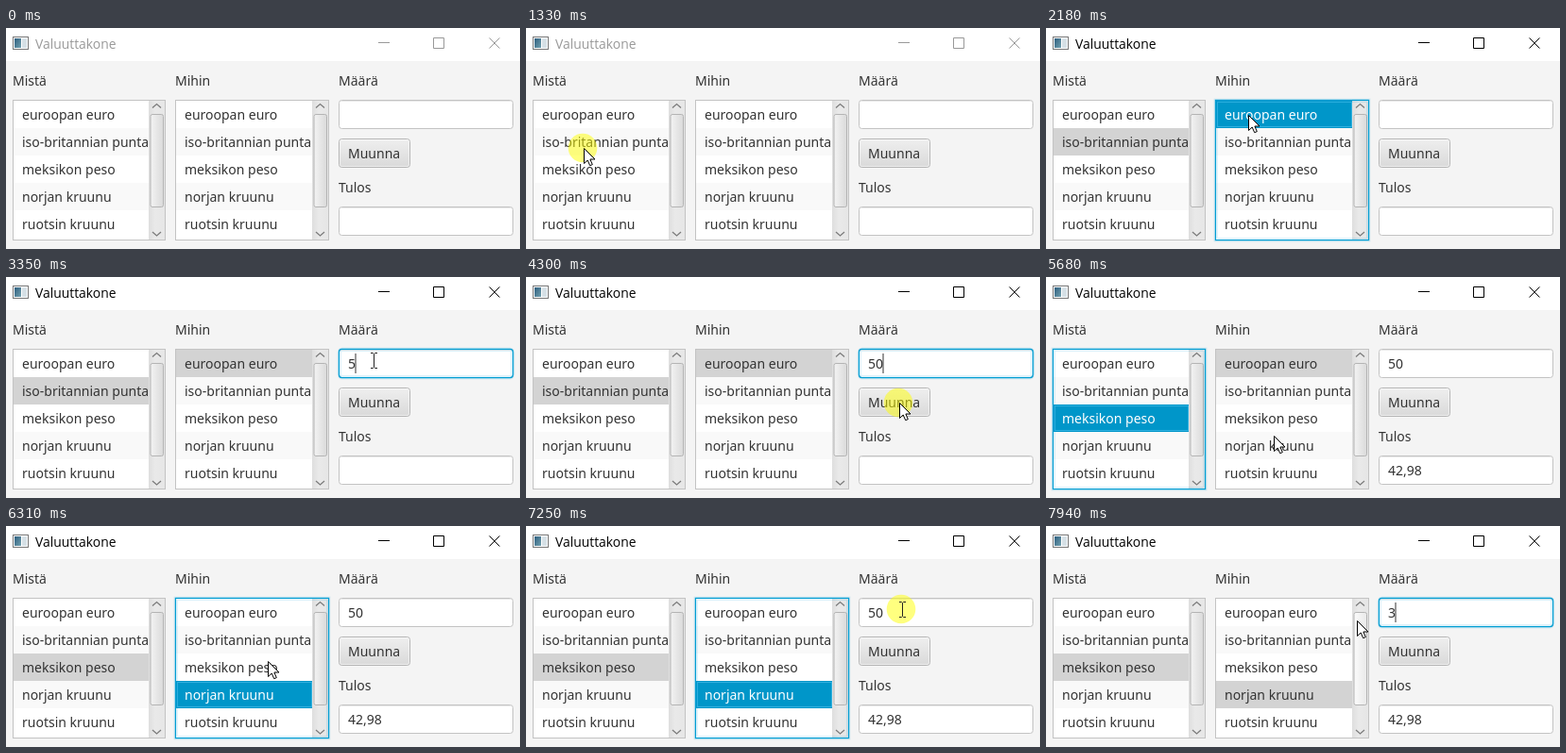
Recreate the animation shown at these times as an HTML page. Size 544 px wide and 234 px high, loop 8 s.

```html
<!DOCTYPE html>
<html lang="fi">
<head>
<meta charset="utf-8">
<title>Valuuttakone</title>
<style>
html, body { margin: 0; width: 100%; height: 100%; overflow: hidden; background: #f4f4f4; }
svg { display: block; width: 544px; height: 234px; }
text { font: 14px "Noto Sans", "Open Sans", sans-serif; fill: #333; white-space: pre; }
.title { font: 13.9px "Open Sans", "Noto Sans", sans-serif; }
</style>
</head>
<body>
<svg id="stage" viewBox="0 0 544 234">
  <defs>
    <linearGradient id="btn" x2="0" y2="1"><stop stop-color="#efefef"/><stop offset="1" stop-color="#d9d9d9"/></linearGradient>
    <linearGradient id="thumb"><stop stop-color="#f3f3f3"/><stop offset="1" stop-color="#dadada"/></linearGradient>
    <linearGradient id="thumbHover"><stop stop-color="#fbfbfb"/><stop offset="1" stop-color="#e9e9e9"/></linearGradient>
    <linearGradient id="track"><stop stop-color="#dedede"/><stop offset=".4" stop-color="#e9e9e9"/><stop offset="1" stop-color="#e6e6e6"/></linearGradient>
    <linearGradient id="pane" x2="1" y2="1"><stop stop-color="#2f5f7f"/><stop offset="1" stop-color="#6f9fae"/></linearGradient>
  </defs>
</svg>
<script>
const LOOP = 8000, STEP = 78;
const BLUE = '#0096c9', RING = '#039ed3', BORDER = '#c3c3c3';
const ITEMS = ['euroopan euro', 'iso-britannian punta', 'meksikon peso', 'norjan kruunu', 'ruotsin kruunu'];
const stage = document.getElementById('stage');

function add(tag, attrs, parent = stage) {
  const el = document.createElementNS('http://www.w3.org/2000/svg', tag);
  set(el, attrs);
  parent.append(el);
  return el;
}
function set(el, attrs) {
  for (const k in attrs) el.setAttribute(k, attrs[k]);
}
function rect(x, y, width, height, fill, more = {}, parent = stage) {
  return add('rect', { x, y, width, height, fill, ...more }, parent);
}
function label(x, y, str, parent = stage) {
  const el = add('text', { x, y }, parent);
  el.textContent = str;
  return el;
}
const show = (el, on) => el.setAttribute('visibility', on ? 'visible' : 'hidden');

// focus ring with a faint halo around the box
function makeRing(x, y, w, h, rx = 0) {
  const ring = add('g', { fill: 'none', stroke: RING });
  rect(x + .8, y + .8, w - 1.6, h - 1.6, 'none', { rx, 'stroke-width': 4.4, 'stroke-opacity': .13 }, ring);
  rect(x + .4, y + .4, w - .8, h - .8, 'none', { rx, 'stroke-width': 1.2 }, ring);
  return ring;
}

// title bar
rect(0, 0, 544, 234, '#f4f4f4');
rect(0, 0, 544, 35, '#fff');
rect(7.5, 9.5, 16, 13, '#fff', { stroke: '#777' });
rect(9, 11, 7, 10, 'url(#pane)');
rect(17, 11, 5, 10, '#d5e0e6');
const title = label(31, 22, 'Valuuttakone');
set(title, { class: 'title' });
const controls = add('path', { d: 'M394 15.5h12M452.5 10.5h11v11h-11zM511.5 10.5l11 11m0-11l-11 11', fill: 'none' });

label(7, 61, 'Mistä');
label(179, 61, 'Mihin');
label(352, 61, 'Määrä');
label(352, 174, 'Tulos');

function makeList(x, w) {
  const bar = x + w - 18;
  const clip = add('clipPath', { id: 'clip' + x });
  rect(x, 76, w - 17, 149, '#000', {}, clip);
  rect(x, 76, w, 149, '#fff');
  const body = add('g', { 'clip-path': `url(#clip${x})` });
  const rows = ITEMS.map((item, i) => ({
    bg: rect(x + 1, 77 + 29 * i, w - 18, 29, '#fff', {}, body),
    edge: rect(x + 2.5, 78.5 + 29 * i, w - 21, 26, 'none', { stroke: '#2fb0df' }, body),
    text: label(x + 10, 97 + 29 * i, item, body)
  }));
  rect(bar, 77, 17, 147, 'url(#track)');
  const thumb = rect(bar + 2, 91.5, 13.5, 98, '#eee', { rx: 2, stroke: '#b4b4b4' });
  add('path', { d: `M${bar + 4} 84.5l4.5-4 4.5 4M${bar + 4} 216l4.5 4 4.5-4`, fill: 'none', stroke: '#7c7c7c', 'stroke-width': 1.3 });
  rect(x + .5, 76.5, w - 1, 148, 'none', { stroke: BORDER });
  const ring = makeRing(x, 76, w, 149);
  return (selected, focused, px, py) => {
    rows.forEach((r, i) => {
      const on = i === selected;
      set(r.bg, { fill: on ? (focused ? BLUE : '#d3d3d3') : i % 2 ? '#f9f9f9' : '#fff' });
      show(r.edge, on && focused);
      r.text.style.fill = on && focused ? '#fff' : '#333';
    });
    const hover = px > bar && px < bar + 17 && py > 91 && py < 190;
    set(thumb, { fill: hover ? 'url(#thumbHover)' : 'url(#thumb)' });
    show(ring, focused);
  };
}
const drawFrom = makeList(7, 162), drawTo = makeList(179, 163);

function makeField(y) {
  rect(352.5, y + .5, 184, 30, '#fff', { rx: 3, stroke: BORDER });
  rect(354, y + 1, 181, 1, '#e8e8e8');
}
makeField(76);
makeField(189);
const amountRing = makeRing(352, 76, 185, 31, 3);
const highlight = rect(361, 81, 18, 21, BLUE);
const amount = add('text', { x: 362, y: 97 });
const digits = [add('tspan', {}, amount), add('tspan', {}, amount)];
const caret = rect(361.5, 81, 1, 21, '#333');
const result = label(362, 210, '42,98');

rect(352.5, 117.5, 75, 30, 'url(#btn)', { rx: 3, stroke: '#b5b5b5' });
rect(353.5, 118.5, 73, 28, 'none', { rx: 2, stroke: '#fff', 'stroke-opacity': .55 });
const buttonRing = makeRing(352, 117, 76, 31, 3);
label(362, 138, 'Muunna');

// pointer
const glow = add('circle', { r: 15.3, fill: '#ff0', 'fill-opacity': .5 });
const arrow = add('path', { d: 'M.5 .5V16.5L4.2 13l2.5 5.7 2.6-1.1L6.9 12H12z', fill: '#fff', stroke: '#000', 'stroke-linejoin': 'round' });
const beam = add('path', { d: 'M-3-7.5h2.5l1 1 1-1h2.5M.5-6.5v14M-3 8.5h2.5l1-1 1 1h2.5', fill: 'none', stroke: '#222' });

// start time, step count, end x, end y
const MOVES = [
  [90, 1, 279, 202], [167, 3, 83, 115], [570, 4, 82, 99], [950, 4, 61, 127],
  [1490, 5, 214, 92], [2258, 4, 389, 88], [3980, 4, 395, 133], [4450, 5, 152, 140],
  [4850, 3, 100, 152], [5230, 5, 228, 153], [5600, 2, 241, 168], [6150, 10, 380, 72],
  [6940, 1, 357, 71], [7020, 1, 392, 70], [7170, 1, 398, 88], [7325, 5, 329, 100]
];
const PRESSES = [[1330, 1408], [2100, 2180], [2570, 2650], [4295, 4375], [5085, 5165], [5920, 6000], [7250, 7620]];
const FOCUS = [[0, ''], [1408, 'from'], [2180, 'to'], [2650, 'amount'], [4375, 'button'], [5165, 'from'], [6000, 'to'], [7325, 'amount']];

// value of the latest entry at time t
const latest = (list, t) => list.filter(e => e[0] <= t).pop()[1];
const ease = p => (p + p * p * (3 - 2 * p)) / 2;

function pointerAt(t) {
  let x = 279, y = 202;
  for (const [start, n, tx, ty] of MOVES) {
    if (t < start) break;
    const p = ease(Math.min(n, Math.floor((t - start) / STEP) + 1) / n);
    x += (tx - x) * p;
    y += (ty - y) * p;
  }
  return [Math.round(x), Math.round(y)];
}

function draw(t) {
  const focus = latest(FOCUS, t);
  const [x, y] = pointerAt(t);
  const active = t >= 1408;
  title.style.fill = active ? '#000' : '#999';
  set(controls, { stroke: active ? '#000' : '#999' });

  drawFrom(latest([[0, -1], [1408, 1], [5165, 2]], t), focus === 'from', x, y);
  drawTo(latest([[0, -1], [2180, 0], [6000, 3]], t), focus === 'to', x, y);

  const typing = focus === 'amount';
  show(amountRing, typing);
  const value = latest([[0, ''], [3350, '5'], [3900, '50'], [7940, '3']], t);
  const dragging = t >= 7325 && t < 7940;
  const picked = !dragging ? 0 : x < 366 ? 2 : x < 375 ? 1 : 0;
  digits.forEach((d, i) => {
    d.textContent = value[i] || '';
    d.style.fill = i >= 2 - picked ? '#fff' : '#333';
  });
  set(highlight, { x: picked === 2 ? 361 : 370, width: picked === 2 ? 18 : 9 });
  show(highlight, picked > 0);
  set(caret, { x: 361.5 + 8 * value.length });
  show(caret, typing && !picked && (t < 3200 || t >= 3350));
  show(result, t >= 4375);
  show(buttonRing, focus === 'button');

  const inField = x >= 352 && x <= 537 && y >= 76 && y <= 107;
  set(glow, { cx: x - 1, cy: y });
  show(glow, PRESSES.some(([a, b]) => t >= a && t < b));
  for (const el of [arrow, beam]) set(el, { transform: `translate(${x} ${y})` });
  show(arrow, t >= 90 && !inField);
  show(beam, t >= 90 && inField);
}

let origin;
function tick(now) {
  origin ??= now;
  draw((now - origin) % LOOP);
  requestAnimationFrame(tick);
}
draw(0);
requestAnimationFrame(tick);
</script>
</body>
</html>
```
